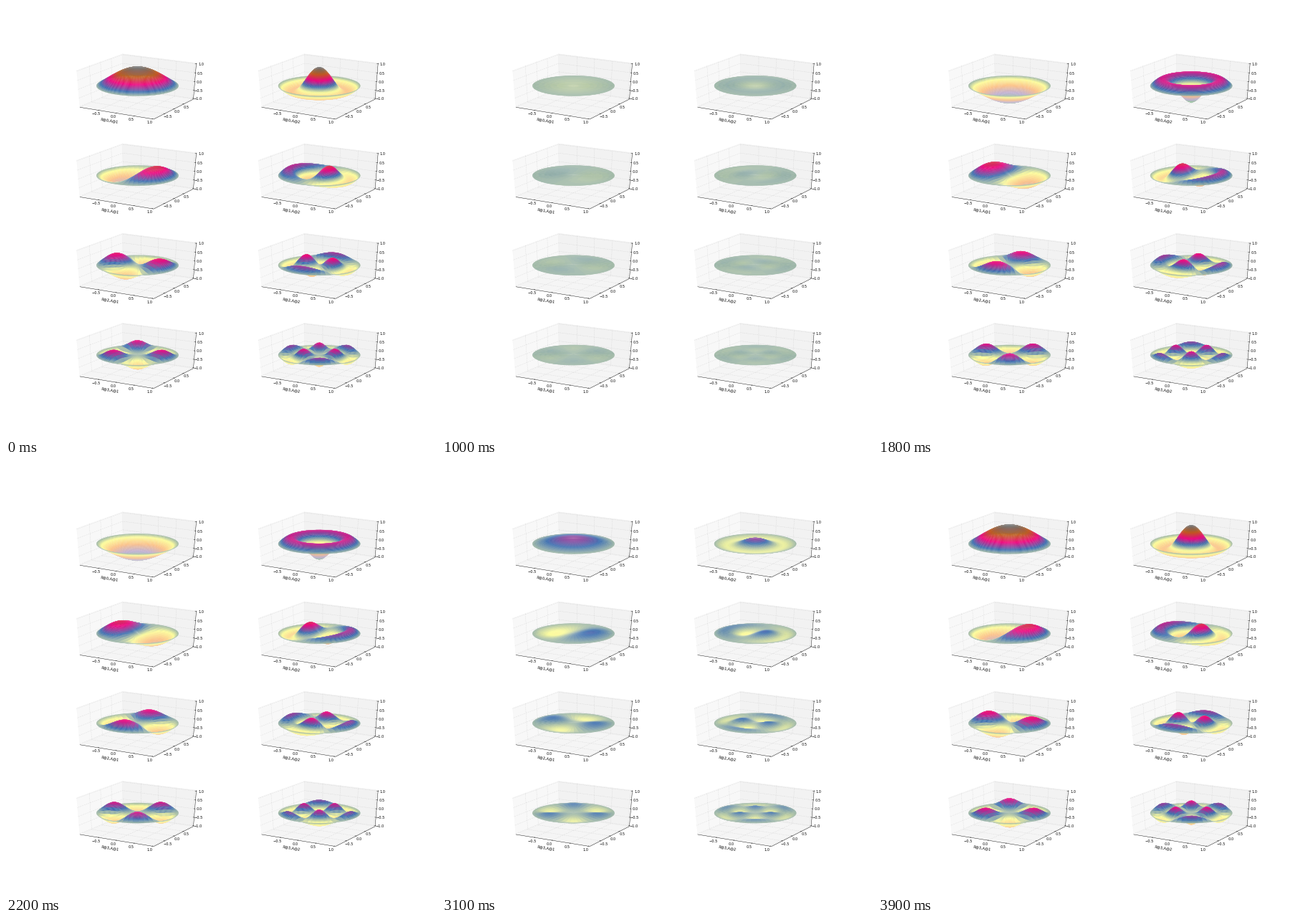
A matplotlib script that plays this animation: 600x600 px, repeating every 4000 ms.

```python
import numpy as np
import matplotlib.pyplot as plt
from matplotlib.animation import FuncAnimation
from matplotlib.collections import LineCollection, PolyCollection
from matplotlib.colors import LinearSegmentedColormap

SIZE, DPI, FRAMES, INTERVAL = 600, 100, 40, 100
PX = 72 / DPI

# Grid of panels: four rows, two columns
W = 0.775 * SIZE / 2.2
H = 0.8 * SIZE / 4.6
CENTER = np.array([0.125 * SIZE + W * 0.95 / 1.85, 0.1 * SIZE + H * 0.9 / 1.85])
STEP = np.array([1.2 * W, 1.2 * H])

# Camera
DIST = 10
ELEV, AZIM = np.radians(30), np.radians(-60)
RIGHT = np.array([-np.sin(AZIM), np.cos(AZIM), 0])
TOWARD = np.array([np.cos(ELEV) * np.cos(AZIM), np.cos(ELEV) * np.sin(AZIM), np.sin(ELEV)])
UP = np.cross(TOWARD, RIGHT)

LOW = np.array([-0.998, -0.9995, -1])
HIGH = np.array([1, 0.9995, 1])
EDGE = 0.5 + 1 / 48
DELTA = 1 / 12
TICKS = [(-0.5, 0, 0.5, 1), (-0.5, 0, 0.5), (-1, -0.5, 0, 0.5, 1)]

ZEROS = [(2.4048, 5.5201), (3.8317, 7.0156), (5.1356, 8.4172), (6.3802, 9.7610)]
N_R, N_THETA = 50, 50
DETAIL = 8 / 3
PANE = 0.96

CMAP = LinearSegmentedColormap.from_list("accent", plt.get_cmap("Accent").colors)


def to_unit(p):
    """Data coordinates to a unit cube centred on the origin."""
    return (np.asarray(p, float) - LOW) / (HIGH - LOW) - 0.5


def project(p, offset=(0, 0)):
    """Unit-cube points to stage pixels, and their distance from the camera."""
    p = np.asarray(p, float)
    depth = DIST - p @ TOWARD
    x = CENTER[0] + offset[0] + p @ RIGHT / depth * W * DIST / 1.85
    y = CENTER[1] + offset[1] - p @ UP / depth * H * DIST / 1.85
    return np.stack([x, y], axis=-1), depth


def bessel(n, x):
    tau = (np.arange(200) + 0.5) * np.pi / 200
    return np.cos(n * tau - x[..., None] * np.sin(tau)).mean(axis=-1)


def quads(a):
    return np.stack([a[:-1, :-1], a[1:, :-1], a[1:, 1:], a[:-1, 1:]], axis=2).reshape(-1, 4, *a.shape[2:])


def facet_colors(shapes, heights):
    """Colour by height; thin facets let some of the pane show through."""
    a, b = shapes[:, 2] - shapes[:, 0], shapes[:, 3] - shapes[:, 1]
    area = np.abs(a[:, 0] * b[:, 1] - a[:, 1] * b[:, 0]) / 2
    sides = np.roll(shapes, -1, axis=1) - shapes
    longest = np.hypot(sides[..., 0], sides[..., 1]).max(axis=1)
    bleed = np.exp(-1 - DETAIL * area / longest)[:, None]
    colors = CMAP((heights + 1) / 2)
    colors[:, :3] += bleed * (PANE - colors[:, :3])
    return colors


fig = plt.figure(figsize=(SIZE / DPI, SIZE / DPI), dpi=DPI, facecolor="white")
ax = fig.add_axes([0, 0, 1, 1])
ax.set_xlim(0, SIZE)
ax.set_ylim(SIZE, 0)
ax.axis("off")


def write(pos, text, angle=0, shift=(-0.8, 1.3)):
    ax.text(pos[0] + shift[0], pos[1] + shift[1], text, fontsize=5 * PX, family="DejaVu Sans",
            ha="center", va="center", rotation=angle)


def tick_parts(axis, value):
    """Grid path, tick ends and label place for one tick."""
    v = to_unit(np.full(3, value))[axis]
    e, out, inn, pad = EDGE, EDGE + 0.1 * DELTA, EDGE - 0.2 * DELTA, EDGE + 0.58 * DELTA
    if axis == 0:
        return [(v, -e, -e), (v, e, -e), (v, e, e)], [(v, -out, -e), (v, -inn, -e)], (v, -pad, -pad)
    if axis == 1:
        return [(e, v, -e), (-e, v, -e), (-e, v, e)], [(out, v, -e), (inn, v, -e)], (pad, v, -pad)
    return [(-e, -e, v), (-e, e, v), (e, e, v)], [(out, e, v), (inn, e, v)], (pad, pad, v)


def draw_box(offset, label):
    e = EDGE
    panes = [[(-e, -e, -e), (-e, e, -e), (-e, e, e), (-e, -e, e)],
             [(-e, e, -e), (e, e, -e), (e, e, e), (-e, e, e)],
             [(-e, -e, -e), (e, -e, -e), (e, e, -e), (-e, e, -e)]]
    shades = [(g, g, g, 0.5) for g in (0.95, 0.9, 0.925)]
    ax.add_collection(PolyCollection([project(p, offset)[0] for p in panes], facecolors=shades,
                                     edgecolors=shades, linewidths=0.3, zorder=1))
    grid = []
    lines = [project(p, offset)[0] for p in ([(-e, -e, -e), (e, -e, -e)],
                                             [(e, -e, -e), (e, e, -e)],
                                             [(e, e, -e), (e, e, e)])]
    rise = lines[0][1] - lines[0][0]
    for axis, values in enumerate(TICKS):
        for value in values:
            path, tick, place = tick_parts(axis, value)
            grid.append(project(path, offset)[0])
            lines.append(project(tick, offset)[0])
            write(project(place, offset)[0], f"{value:.1f}".replace("-", "\u2212"))
    ax.add_collection(LineCollection(grid, colors="0.68", linewidths=0.3,
                                     linestyles=[(0, (1, 3))], zorder=2))
    ax.add_collection(LineCollection(lines, colors="black", linewidths=0.3, zorder=3))
    far = e + 1.6 * DELTA
    write(project((0, -far, -far), offset)[0], label,
          -np.degrees(np.arctan2(rise[1], rise[0])), (-0.8, 0.8))


r, theta = np.meshgrid(np.linspace(0, 1, N_R), np.linspace(0, 2 * np.pi, N_THETA), indexing="ij")
x, y = r * np.cos(theta), r * np.sin(theta)
modes = []
for n, row in enumerate(ZEROS):
    for m, zero in enumerate(row):
        offset = STEP * (m, n)
        draw_box(offset, f"R@{n},A@{m + 1}")
        modes.append((offset, bessel(n, zero * r[:, 0])[:, None] * np.cos(n * theta)))

surface = PolyCollection([], linewidths=0.2, zorder=4, snap=False)
ax.add_collection(surface)


def update(frame):
    swing = np.cos(2 * np.pi * frame / (FRAMES - 1))
    shapes, heights = [], []
    for offset, mode in modes:
        z = mode * swing
        points, depth = project(to_unit(np.stack([x, y, z], axis=-1)), offset)
        order = np.argsort(-quads(depth).mean(axis=1))
        shapes.append(quads(points)[order])
        heights.append(quads(z).mean(axis=1)[order])
    shapes = np.concatenate(shapes)
    colors = facet_colors(shapes, np.concatenate(heights))
    surface.set_verts(shapes)
    surface.set_facecolor(colors)
    surface.set_edgecolor(colors)
    return [surface]


anim = FuncAnimation(fig, update, frames=FRAMES, interval=INTERVAL, repeat=True, repeat_delay=0)
plt.show()
```
